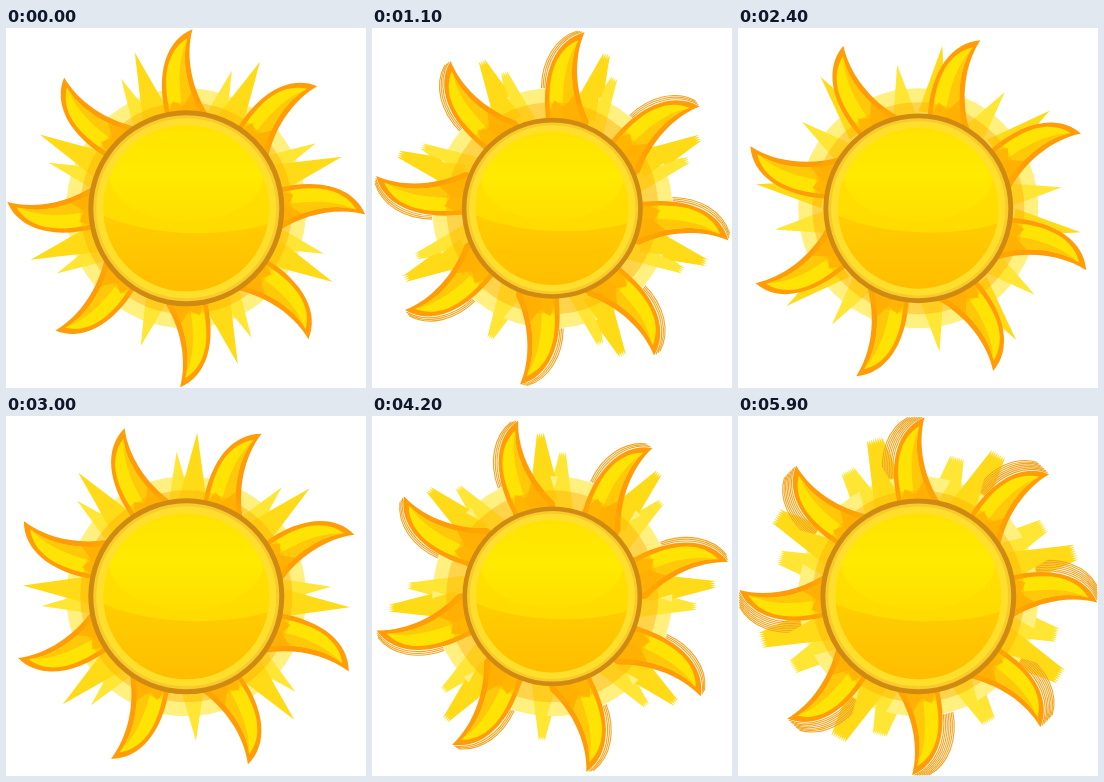
These frames come from a looping animation (360 px wide and 360 px high, 6 s). An HTML page with a canvas:

```html
<!DOCTYPE html>
<html lang="en">
<head>
<meta charset="utf-8">
<title>Sun</title>
<style>
  html, body { margin: 0; width: 100%; height: 100%; overflow: hidden; background: #fff; }
  canvas { display: block; width: 360px; height: 360px; }
</style>
</head>
<body>
<canvas id="stage" width="360" height="360"></canvas>
<script>
const ctx = document.getElementById('stage').getContext('2d');
const LOOP = 6000, STEP = 100, TURN = 45 / 59;
const RAD = Math.PI / 180;

// [time, number of earlier poses that linger outside the halo]
const TRAIL = [[0, 0], [1100, 3], [2300, 0], [3500, 0], [4200, 3], [5200, 5], [5900, 7]];

const flame = new Path2D('M-21-84V-90C-33-135-22-168 4-179C-3-152 4-118 22-92V-84Z');
const flameEdge = new Path2D('M-25-118C-28-145-17-170 4-179');
const flameFill = new Path2D('M-16-84V-90C-28-133-20-158-1-170C-7-148-1-118 16-90V-84Z');
const flameShade = new Path2D('M-1-169C-12-145-9-115-2-84H16V-90C-1-118-7-148-1-169Z');
const flameBase = new Path2D('M-21-84L-15-107L-4-102L4-116L22-92V-84Z');
const longSpike = new Path2D('M-14-96L0-164L14-96Z');
const shortSpike = new Path2D('M-13-86L0-145L13-86Z');
const LONG_GAP = 5;

function fill(path, color) {
  ctx.fillStyle = color;
  ctx.fill(path);
}

function disc(r, color) {
  ctx.fillStyle = color;
  ctx.beginPath();
  ctx.arc(0, 0, r, 0, 2 * Math.PI);
  ctx.fill();
}

// Repeats a ray eight times around the centre, leaving out one place if given.
function around(angle, draw, gap) {
  for (let i = 0; i < 8; i++) {
    if (i === gap) continue;
    ctx.save();
    ctx.rotate((angle + i * 45) * RAD);
    draw();
    ctx.restore();
  }
}

function trailAt(t) {
  const i = TRAIL.findIndex(([time]) => time > t);
  if (i < 0) return TRAIL[TRAIL.length - 1][1];
  const [t0, n0] = TRAIL[i - 1], [t1, n1] = TRAIL[i];
  return Math.round(n0 + (n1 - n0) * (t - t0) / (t1 - t0));
}

function drawSpikes(turn) {
  around(18.3 + turn, () => fill(shortSpike, '#ffe534'));
  around(-18.3 - turn, () => fill(longSpike, '#ffda16'), LONG_GAP);
}

function drawFlame() {
  fill(flame, '#ff9c08');
  fill(flameFill, '#ffe304');
  fill(flameShade, '#ffc808');
  fill(flameBase, 'rgba(255,164,0,.6)');
}

function drawTrail(turn, count) {
  for (let k = count; k > 0; k--) drawSpikes(turn - TURN * k);
  ctx.strokeStyle = '#f2a626';
  ctx.lineWidth = 1.1;
  for (let k = count; k > 0; k--) {
    around(0.7 + turn - TURN * k, () => ctx.stroke(flameEdge));
  }
}

function drawBall(r) {
  const s = r / 98;
  ctx.save();
  ctx.scale(s, s);
  disc(98, '#d08a12');
  disc(93, '#f8cb2c');
  disc(90, '#ffdf2c');

  const body = ctx.createLinearGradient(0, -83, 0, 83);
  body.addColorStop(0, '#ffe200');
  body.addColorStop(1, '#ffd800');
  disc(83, body);

  ctx.beginPath();
  ctx.arc(0, 0, 83, 0, 2 * Math.PI);
  ctx.clip();
  const low = ctx.createLinearGradient(0, 0, 0, 84);
  low.addColorStop(0, '#ffd000');
  low.addColorStop(1, '#ffbd00');
  fill(new Path2D('M-90 4C-50 25 30 34 90 13V90H-90Z'), low);

  const shine = ctx.createLinearGradient(0, -82, 0, 14);
  shine.addColorStop(0, '#ffe400');
  shine.addColorStop(0.5, '#ffea00');
  shine.addColorStop(1, '#ffde00');
  ctx.fillStyle = shine;
  ctx.beginPath();
  ctx.ellipse(0, -33, 77, 46, 0, 0, 2 * Math.PI);
  ctx.fill();
  ctx.restore();
}

function render(time) {
  const step = Math.floor((time % LOOP) / STEP);
  const t = step * STEP;
  const turn = step * TURN;
  const radius = 93.5 + 4.5 * Math.cos(4 * Math.PI * t / LOOP);

  ctx.setTransform(1, 0, 0, 1, 0, 0);
  ctx.fillStyle = '#fff';
  ctx.fillRect(0, 0, 360, 360);
  ctx.translate(180.3, 180.3);

  drawTrail(turn, trailAt(t));
  disc(120, '#fff080');
  drawSpikes(turn);
  around(0.7 + turn, drawFlame);
  disc(106, 'rgba(255,172,0,.42)');
  drawBall(radius);
}

const start = performance.now();
function tick() {
  render(performance.now() - start);
  requestAnimationFrame(tick);
}
tick();
</script>
</body>
</html>
```
